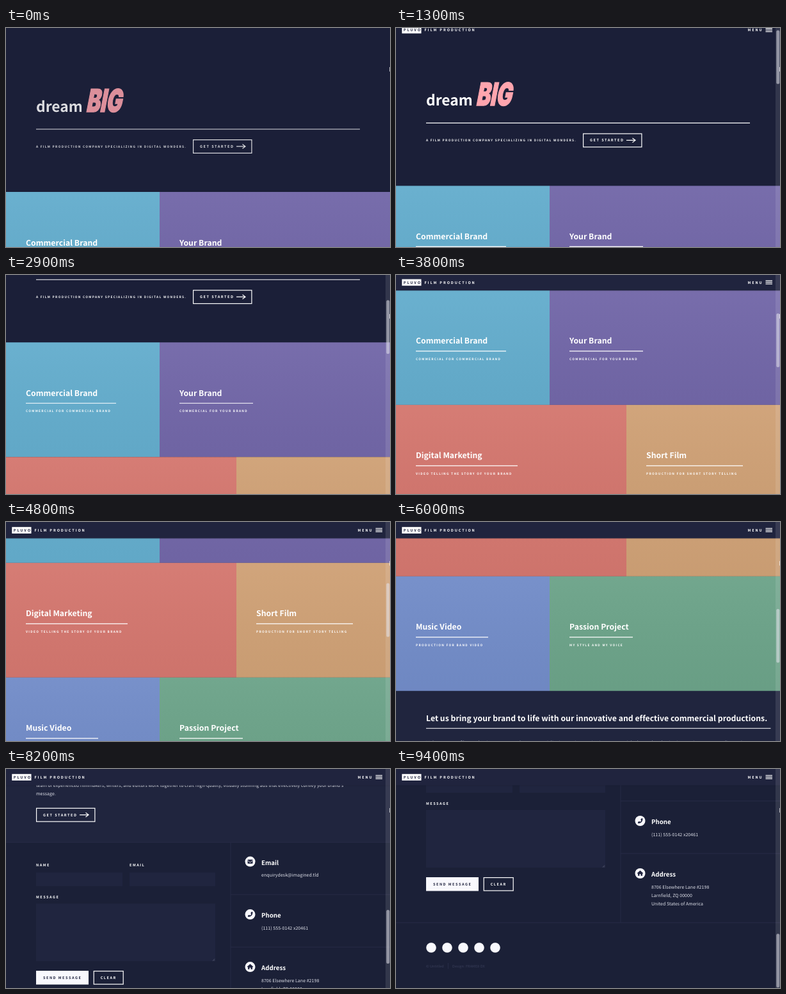
An HTML page that plays this animation: 600x342 px, repeating every 9.5 s.

```html
<!DOCTYPE html>
<html lang="en">
<head>
<meta charset="utf-8">
<title>Film production page</title>
<style>
  html, body { margin: 0; width: 100%; height: 100%; overflow: hidden; background: #1b1f38; }
  svg { display: block; width: 600px; height: 342px; }
  text {
    font-family: "Noto Sans CJK JP", "Noto Sans CJK SC", "Noto Sans CJK", "Noto Sans", sans-serif;
    text-rendering: geometricPrecision;
    fill: #fff;
    white-space: pre;
  }
  .tiny, .caps, .nav, .title, .sub { font-weight: 600; }
  .tiny { font-size: 4.81px; letter-spacing: 1.3px; }
  .caps { font-size: 5.59px; letter-spacing: 1.5px; }
  .nav { font-size: 5.59px; letter-spacing: 1.9px; }
  .title { font-size: 12.22px; letter-spacing: .03px; }
  .sub { font-size: 9.7px; }
  .body { font-size: 6.98px; letter-spacing: .065px; fill: #dfe1ea; }
  .faint { font-size: 5.5px; letter-spacing: .1px; fill: #3a3f5b; }
  .big { font: 900 49px Inter, sans-serif; fill: #ffa5ae; stroke: #ffa5ae; stroke-width: 1.6; }
  .line { fill: none; stroke: #fff; stroke-width: 1.2; }
  .rule { fill: none; stroke: #272b46; }
  .field { fill: #20253f; }
  .ink { fill: #20243f; }
  .disc { fill: #f8f8fd; }
</style>
</head>
<body>
<svg viewBox="0 0 600 342">
  <defs>
    <path id="arrow" class="line" d="M0 0h14m-4.5 -3.4l4.5 3.4l-4.5 3.4"/>
    <linearGradient id="shade" x2="0" y2="1">
      <stop offset="0" stop-color="#fff" stop-opacity=".04"/>
      <stop offset="1" stop-color="#000" stop-opacity=".03"/>
    </linearGradient>
  </defs>

  <g id="page">
    <rect width="600" height="256" fill="#1b1f38"/>
    <g id="hero">
      <text x="47" y="131" font-size="22.8" font-weight="600">dream</text>
      <text class="big" transform="translate(124.5 130.5) skewX(-11) scale(.66 1)">BIG</text>
      <path class="line" d="M47 158H553"/>
      <text class="tiny" x="47" y="186.7">A FILM PRODUCTION COMPANY SPECIALIZING IN DIGITAL WONDERS.</text>
      <rect class="line" x="292.6" y="174.6" width="91.3" height="20.8"/>
      <text class="caps" x="303" y="186.9">GET STARTED</text>
      <use href="#arrow" x="360" y="184.9"/>
    </g>

    <g id="tiles"></g>

    <rect y="793" width="600" height="182" fill="#20253e"/>
    <text class="title" x="47" y="840.4">Let us bring your brand to life with our innovative and effective commercial productions.</text>
    <path class="line" d="M47 851.4H585.5"/>
    <text class="body" x="47" y="876.5">Welcome to our film production company, where we specialize in creating captivating commercials that make a lasting impression on your audience. Our</text>
    <text class="body" x="47" y="889.4">team of experienced filmmakers, writers, and editors work together to craft high-quality, visually stunning ads that effectively convey your brand's</text>
    <text class="body" x="47" y="902.3">message.</text>
    <rect class="line" x="47.6" y="922.2" width="91.3" height="20.8"/>
    <text class="caps" x="58" y="934.5">GET STARTED</text>
    <use href="#arrow" x="115" y="932.5"/>

    <rect y="975" width="600" height="374" fill="#1b2037"/>
    <path class="rule" d="M0 975.5H600M351 975V1247M351 1057H600M351 1139H600M0 1247H600"/>
    <text class="caps" x="47" y="1013">NAME</text>
    <text class="caps" x="193" y="1013">EMAIL</text>
    <text class="caps" x="47" y="1062.6">MESSAGE</text>
    <rect class="field" x="47" y="1022.5" width="135" height="21.5"/>
    <rect class="field" x="193" y="1022.5" width="134" height="21.5"/>
    <rect class="field" x="47" y="1071" width="280" height="90"/>
    <path d="M323 1160.500l3 -3m-1 3l1 -1" stroke="#7d8092" stroke-width=".6"/>
    <rect class="disc" x="47" y="1176" width="82" height="21.500"/>
    <text class="caps ink" x="58" y="1189">SEND MESSAGE</text>
    <rect class="line" x="137.200" y="1176.600" width="46" height="20.400"/>
    <text class="caps" x="147.700" y="1189">CLEAR</text>

    <circle class="disc" cx="381.500" cy="1005.500" r="8"/>
    <rect class="ink" x="377.500" y="1002.400" width="8" height="6.200" rx=".8"/>
    <path d="M377.500 1003.800l4 2.900l4 -2.900" fill="none" stroke="#fff" stroke-width=".8"/>
    <text class="sub" x="399" y="1010.500">Email</text>
    <text class="body" x="399" y="1029.200">enquirydesk@imagined.tld</text>

    <circle class="disc" cx="381.500" cy="1088" r="8"/>
    <path class="ink" d="M384.900 1084l-1.900 .500l-.7 2l1 .9q-.6 1.500 -2 2.200l-1 -1l-2 .8l-.5 1.800l.8 .8q6.500 -.4 7 -7.300z"/>
    <text class="sub" x="399" y="1093">Phone</text>
    <text class="body" x="399" y="1111.700">(111) 555-0142 x20461</text>

    <circle class="disc" cx="381.500" cy="1170" r="8"/>
    <path class="ink" d="M381.500 1165.500l4.800 4.200l-.6 .7l-.7 -.5v3.800h-2.500v-2.600h-2v2.600h-2.500v-3.800l-.7 .5l-.6 -.7z"/>
    <text class="sub" x="399" y="1175">Address</text>
    <text class="body" x="399" y="1193.800">8706 Elsewhere Lane #2198</text>
    <text class="body" x="399" y="1206.700">Larnfield, ZQ 00000</text>
    <text class="body" x="399" y="1219.600">United States of America</text>

    <g id="social"></g>
    <text class="faint" x="47" y="1316.500">© Untitled</text>
    <text class="faint" x="88" y="1316.500">Design: FRAME8 OX</text>
    <path class="rule" d="M81.500 1310V1319"/>
  </g>

  <g id="header">
    <g id="bar">
      <rect y="25.500" width="600" height="1" fill="#000" opacity=".12"/>
      <rect width="600" height="25.500" fill="#20243e"/>
    </g>
    <rect x="9.300" y="7.800" width="30.200" height="10.200" fill="#fff"/>
    <text class="nav ink" x="11.800" y="15">PLUVO</text>
    <text class="nav" x="44.500" y="15">FILM PRODUCTION</text>
    <text class="nav" x="549.500" y="15">MENU</text>
    <path class="line" stroke-width="1" d="M577.500 10.200h10.500m-10.500 2.500h10.500m-10.500 2.500h10.500"/>
  </g>

  <g id="scrollbar">
    <rect x="593" width="7" height="342" fill="#fff" opacity=".1"/>
    <rect id="thumb" x="594.300" width="5" height="84" rx="2.500" fill="#e4e4ec" opacity=".55"/>
  </g>
  <rect x="599.200" y="61" width=".8" height="7" fill="#fff" opacity=".8"/>
</svg>

<script>
const LOOP = 9500;
const $ = id => document.getElementById(id);
const clamp = v => Math.min(1, Math.max(0, v));

// x, row, width, colour, title, underline width, caption
const tiles = [
  [0, 0, 240, '#64adcd', 'Commercial Brand', 141, 'COMMERCIAL FOR COMMERCIAL BRAND'],
  [240, 0, 360, '#7267a8', 'Your Brand', 115, 'COMMERCIAL FOR YOUR BRAND'],
  [0, 1, 360, '#d4776f', 'Digital Marketing', 159, 'VIDEO TELLING THE STORY OF YOUR BRAND'],
  [360, 1, 240, '#cfa176', 'Short Film', 151, 'PRODUCTION FOR SHORT STORY TELLING'],
  [0, 2, 240, '#728cc8', 'Music Video', 113, 'PRODUCTION FOR BAND VIDEO'],
  [240, 2, 360, '#6ca389', 'Passion Project', 99, 'MY STYLE AND MY VOICE']
];
$('tiles').innerHTML = tiles.map(([x, row, w, colour, title, rule, caption]) => `
  <g transform="translate(${x} ${256 + row * 179})">
    <rect width="${w}" height="179" fill="${colour}"/>
    <rect width="${w}" height="179" fill="url(#shade)"/>
    <text class="title" x="31" y="83.500">${title}</text>
    <path class="line" d="M31 95h${rule}"/>
    <text class="tiny" x="31" y="109.200">${caption}</text>
  </g>`).join('');
$('social').innerHTML = [55, 80, 105, 130, 155]
  .map(x => `<circle class="disc" cx="${x}" cy="1286" r="7.800"/>`).join('');

// Scroll position over time, joined by a monotone cubic
const stops = [[0, 0], [1050, 0], [2000, 79], [3800, 232], [4800, 371],
  [6000, 529], [7300, 687], [9300, 1007], [LOOP, 1007]];
const slope = i => (stops[i + 1][1] - stops[i][1]) / (stops[i + 1][0] - stops[i][0]);
const tangents = stops.map((_, i) => {
  if (i === 0 || i === stops.length - 1) return 0;
  const a = slope(i - 1), b = slope(i);
  return a * b > 0 ? 2 * a * b / (a + b) : 0;
});

function scrollAt(t) {
  let i = 0;
  while (i < stops.length - 2 && t >= stops[i + 1][0]) i++;
  const [t0, y0] = stops[i], [t1, y1] = stops[i + 1];
  const d = t1 - t0, p = (t - t0) / d, q = 1 - p;
  return y0 * q * q * (1 + 2 * p) + y1 * p * p * (3 - 2 * p)
    + d * p * q * (tangents[i] * q - tangents[i + 1] * p);
}

function draw(t) {
  const scroll = scrollAt(t);
  const pinned = t >= 3530;
  const reveal = 1 - (1 - clamp((t - 3530) / 350)) ** 2;
  const headerY = pinned ? 25.5 * (reveal - 1) : -scroll;
  $('page').setAttribute('transform', `translate(0 ${-scroll})`);
  $('hero').setAttribute('opacity', 0.85 + 0.15 * clamp(t / 500));
  $('header').setAttribute('transform', `translate(0 ${headerY})`);
  $('header').setAttribute('opacity', clamp(t / 600));
  $('bar').setAttribute('opacity', pinned ? 1 : 0);
  $('scrollbar').setAttribute('opacity', clamp((t - 1050) / 100));
  $('thumb').setAttribute('y', 1 + scroll * 0.2545);
}

const start = performance.now();
function tick() {
  draw((performance.now() - start) % LOOP);
  requestAnimationFrame(tick);
}
tick();
</script>
</body>
</html>
```
